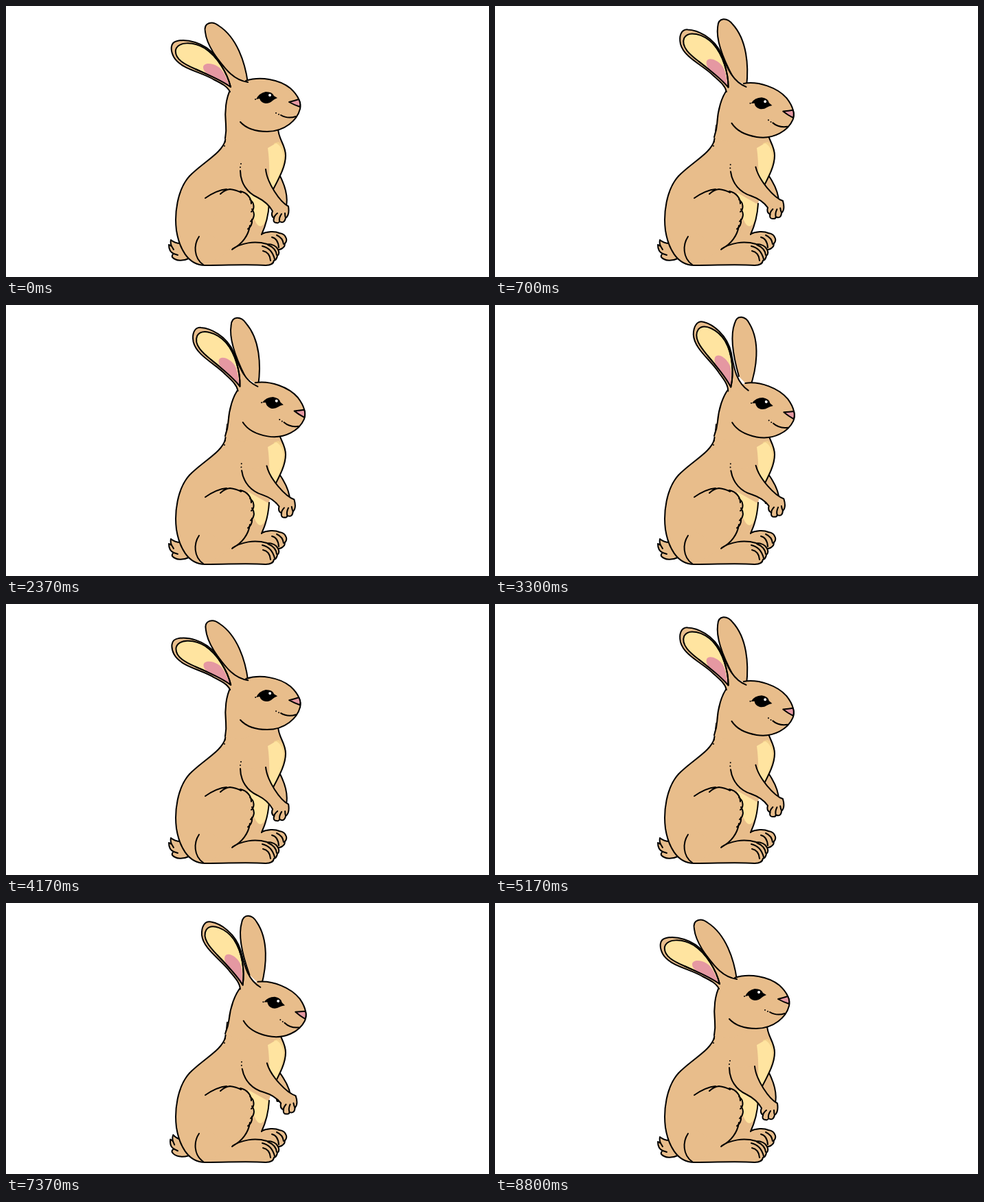
Animation, 703 px wide and 395 px high, one loop 9.01 s. Source, as an HTML page:

```html
<!DOCTYPE html>
<html lang="en">
<head>
<meta charset="utf-8">
<title>Rabbit</title>
<style>
html, body { margin: 0; width: 100%; height: 100%; overflow: hidden; background: #fff; }
svg { display: block; width: 100%; height: 100%; }
path { fill: none; stroke: #000; stroke-width: 2; stroke-linecap: round; stroke-linejoin: round; }
.fur { fill: #e8bd8b; }
.cream { fill: #ffe4a0; }
.pink { fill: #e598a2; }
.shade { fill: #f3d08d; }
.flat { stroke: none; }
.ink { fill: #000; }
</style>
</head>
<body>
<svg viewBox="0 0 703 395">
  <g id="tail">
    <path class="fur" d="M266 368 C258 372 247 372 242 366 Q241 363 244 361 Q237 358 237 348 L241 350 Q239 346 240 341 Q246 346 254 346 L270 360"/>
    <path d="M244 361 L250 363 M241 350 L244 355"/>
  </g>

  <!-- far foot and far arm -->
  <path class="fur" d="M370 333 C380 328 392 328 398 331 Q406 332 408 339 Q409 343 406 346 Q406 353 398 355 L392 357 L360 350"/>
  <path d="M387 337 Q396 339 397 352 M394 334 Q403 338 404 347"/>
  <g id="farArm">
    <path class="fur" d="M399 248 C405 260 411 275 408 291 L388 288 L386 262"/>
  </g>

  <!-- body -->
  <path class="fur flat" d="M322 174 Q321 186 319 196 C315 214 285 229 267 248 C249 268 245 303 248 327 C252 352 264 378 290 378 L350 377 L372 333 C379 318 382 305 382 290 L390 266 C399 248 407 233 407 218 C407 202 396 194 396 178Z"/>
  <path class="shade flat" d="M390 200 L397 198 Q407 206 407 218 C407 233 399 248 391 265 L388 262Z"/>
  <path class="cream flat" d="M381 207 Q388 203 393 200 C399 203 404 210 404 220 C403 235 396 250 389 267 L383 256 Q384 228 381 207Z"/>
  <path class="cream flat" d="M352 272 L384 290 C382 304 378 316 373 320 Q368 323 364 316 L356 300Z"/>
  <path d="M396 178 C396 194 407 202 407 218 C407 233 399 248 389 267 M383 288 C382 305 379 318 372 333"/>
  <path class="fur flat" d="M325 267 C345 268 356 278 357 287 C363 292 361 298 359 301 Q362 309 357 314 Q357 322 353 325 L330 354 L290 330Z"/>
  <path d="M322 174 Q321 186 319 196 C315 214 285 229 267 248 C249 268 245 303 248 327 C252 352 264 378 290 378"/>
  <path d="M319 198 v0 M318 204 v0"/>
  <path d="M290 280 C300 273 310 268 321 267 M312 274 Q318 268 326 267 Q335 268 342 272 M341 270 C351 272 357 280 357 288 M355 282 C362 287 362 296 357 300 M358 296 C363 303 361 310 356 314 M358 311 Q359 320 352 325 M355 320 C353 334 344 347 330 354"/>
  <path class="fur" d="M329 355 C342 345 362 342 380 347 Q392 347 396 355 Q399 361 395 364 Q394 370 390 371 Q389 378 378 378 C350 376 325 378 290 378"/>
  <path d="M281 336 C273 348 273 367 287 377 M373 350 Q387 353 391 369 M374 357 Q384 359 385 371 M381 348 Q393 353 394 363"/>

  <g id="arm">
    <path class="fur flat" d="M341 240 C341 258 351 272 366 279 C376 284 383 290 388 299 Q385 305 390 309 Q388 316 394 316 L398 314 Q405 318 407 309 Q413 305 411 292 C399 286 380 258 378 238Z"/>
    <path d="M341 240 C341 258 351 272 366 279 C376 284 383 290 388 299 Q385 306 390 309 Q388 316 394 316 Q397 317 398 314 Q405 318 407 309 Q413 305 411 292 C399 286 380 258 378 238 M342 230 v0 M341 235 v0"/>
    <path d="M395 302 Q390 306 390 310 M401 303 Q397 309 398 314 M406 302 Q406 306 407 309"/>
  </g>

  <g id="head">
    <g id="farEar">
      <path class="fur" d="M352 112 C348 82 336 46 310 29 C300 21 287 24 290 38 C292 56 308 80 330 104"/>
    </g>
    <path class="fur flat" d="M349 109 C370 102 398 107 414 120 C426 131 430 142 428 150 C424 166 406 183 380 183 L345 197 L319 194 C321 178 317 172 319 150 Q321 132 327 121Z"/>
    <path d="M349 109 C370 102 398 107 414 120 C426 131 430 142 428 150 C424 166 406 183 380 183 C364 183 350 179 341 169 M327 121 C320 134 318 154 320 172 Q321 182 319 193"/>
    <path class="pink" d="M412 140 Q420 138 426 136 Q429 141 428 147 Q419 144 412 140Z"/>
    <path d="M400 159 Q410 165 422 161 M393 156 v0 M397 158 v0 M363 136 v0"/>
    <path class="ink flat" d="M364 136 Q368 127 378 125 Q388 125 390 131 L395 134 Q390 136 388 138 Q384 142 378 142 Q371 141 369 135Z"/>
    <circle cx="384" cy="130" r="2" fill="#fff"/>
    <g id="nearEar">
      <path class="fur" d="M352 111 C330 108 318 90 305 73 C288 52 262 48 249 51 C239 53 239 64 244 74 C254 92 284 96 302 107 C314 113 322 117 326 125"/>
      <path class="cream" d="M327 118 C322 98 308 74 290 62 C272 51 250 52 247 64 C245 78 262 86 276 92 C294 100 314 108 327 118Z"/>
      <path class="pink flat" d="M326 117 C321 107 318 94 308 88 C300 83 288 82 287 89 C287 97 296 102 326 117Z"/>
      <path d="M327 118 C322 98 308 74 290 62 M276 92 C294 100 314 108 327 118"/>
    </g>
  </g>
</svg>
<script>
const LOOP = 9010, HALF = 4470;

// keys: [time, angle, optional power that quickens the easing into this key]
const headKeys = [[0, 0], [1000, 11.5], [1900, 8.3], [3180, 13], [4290, 0, .6]];
const earKeys = [[0, 0], [1250, 24], [2150, 15], [3400, 26.8], [4290, 0, .6]];
const tailKeys = [[0, 0], [150, 0], [400, 9], [650, 0], [2550, 0], [2850, 9], [3150, 0]];

function valueAt(keys, t) {
  const i = keys.findIndex(k => k[0] > t);
  if (i < 0) return keys[keys.length - 1][1];
  const [t0, a] = keys[i - 1], [t1, b, power = 1] = keys[i];
  const u = ((t - t0) / (t1 - t0)) ** power;
  return a + (b - a) * (1 - Math.cos(Math.PI * u)) / 2;
}

function turn(id, angle, x, y) {
  document.getElementById(id).setAttribute('transform', `rotate(${angle} ${x} ${y})`);
}

function draw(now) {
  const t = now % LOOP, phase = t < HALF ? t : t - HALF;
  const head = valueAt(headKeys, phase);
  const ear = valueAt(earKeys, phase) - head;
  turn('head', head, 331, 192);
  turn('farEar', ear, 345, 131);
  turn('nearEar', ear, 326, 127);
  turn('arm', -.79 * head, 352, 225);
  turn('farArm', -.79 * head, 397, 250);
  turn('tail', valueAt(tailKeys, phase), 262, 362);
}

const start = performance.now();
function tick() {
  draw(performance.now() - start);
  requestAnimationFrame(tick);
}
tick();
</script>
</body>
</html>
```
